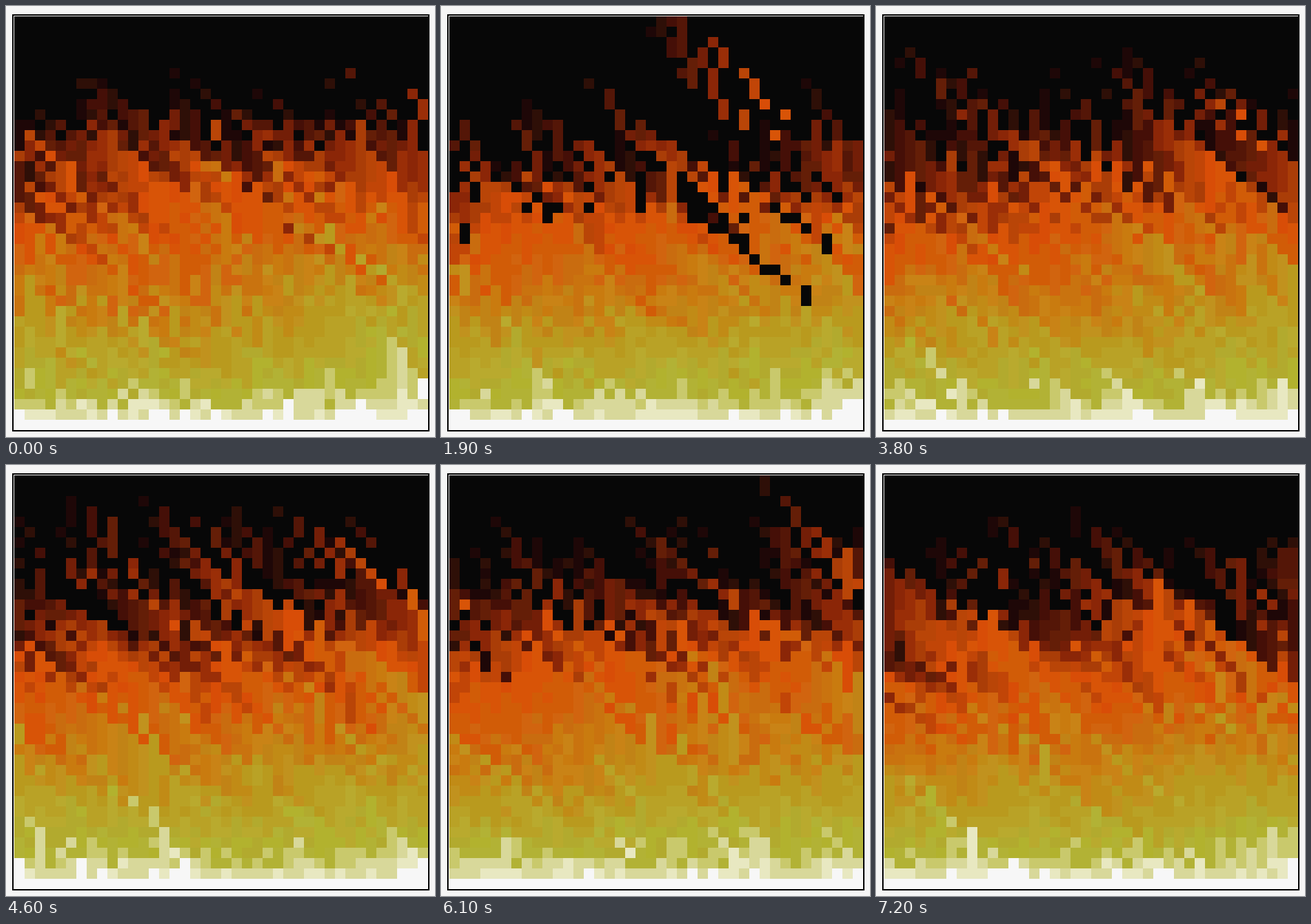
An HTML page with a canvas that plays this animation: 622x625 px, repeating every 7300 ms.

```html
<!DOCTYPE html>
<html lang="en">
<head>
<meta charset="utf-8">
<title>Fire</title>
<style>
  html, body { margin: 0; width: 100%; height: 100%; overflow: hidden; background: #f5f5f5; }
  canvas { display: block; }
</style>
</head>
<body>
<canvas id="stage" width="622" height="625"></canvas>
<script>
const SIZE = 40, CELL = 15, LEFT = 12, TOP = 15, LOOP = 7300;
const HOTTEST = 36, WARM_UP = 90, RESTART_AT = 1200, RESTART_STEPS = 7;

const palette = (
  '070707 1f0707 2f0f07 470f07 571707 671f07 771f07 8f2707 9f2f07 af3f07 ' +
  'bf4707 c74707 df4f07 df5707 df5707 d75f07 d75f07 d7670f cf6f0f cf770f ' +
  'cf7f0f cf8717 c78717 c78f17 c7971f bf9f1f bf9f1f bfa727 bfa727 bfaf2f ' +
  'b7af2f b7b72f b7b737 cfcf6f dfdf9f efefc7 ffffff'
).split(' ').map(hex => {
  const rgb = hex.match(/../g).map(part => Math.round(parseInt(part, 16) * 0.97));
  return `rgb(${rgb})`;
});

// Runs of changes, 100 ms apart: [first, last]
const runs = [
  [0, 400], [600, 700], [1200, 1200], [1400, 1700], [1900, 2400], [2600, 3300],
  [3600, 3600], [3800, 4200], [4400, 4400], [4600, 4700], [4900, 5300],
  [5500, 5900], [6100, 6200], [6400, 7000], [7200, 7200]
];

function seededRandom(seed) {
  return () => {
    seed = (seed + 0x6D2B79F5) | 0;
    let t = Math.imul(seed ^ (seed >>> 15), 1 | seed);
    t = (t + Math.imul(t ^ (t >>> 7), 61 | t)) ^ t;
    return ((t ^ (t >>> 14)) >>> 0) / 4294967296;
  };
}
const random = seededRandom(2024);

function ignite() {
  return new Uint8Array(SIZE * SIZE).fill(HOTTEST, SIZE * (SIZE - 1));
}

// Heat climbs from the bottom row; the cooling also sets the drift to the left.
function spread(heat) {
  for (let row = SIZE - 2; row >= 0; row--) {
    for (let col = 0; col < SIZE; col++) {
      const index = row * SIZE + col;
      const decay = Math.floor(random() * 3);
      const target = index - decay;
      if (target >= 0) heat[target] = Math.max(0, heat[index + SIZE] - decay);
    }
  }
}

function burn(heat, steps) {
  for (let i = 0; i < steps; i++) spread(heat);
  return heat;
}

function buildTimeline() {
  const timeline = [];
  let heat = burn(ignite(), WARM_UP);
  for (const [first, last] of runs) {
    for (let time = first; time <= last; time += 100) {
      if (time === RESTART_AT) heat = burn(ignite(), RESTART_STEPS);
      else if (time > 0) spread(heat);
      timeline.push({ time, heat: heat.slice() });
    }
  }
  return timeline;
}

const ctx = document.getElementById('stage').getContext('2d');
const timeline = buildTimeline();
let shown = null;

function rect(color, x, y, w, h) {
  ctx.fillStyle = color;
  ctx.fillRect(x, y, w, h);
}

function draw(heat) {
  heat.forEach((value, i) => {
    const x = LEFT + (i % SIZE) * CELL;
    const y = TOP + Math.floor(i / SIZE) * CELL;
    rect(palette[value], x, y, CELL, CELL);
  });
}

function tick(now) {
  const time = now % LOOP;
  const step = timeline.findLast(entry => entry.time <= time) || timeline[0];
  if (step !== shown) draw(step.heat);
  shown = step;
  requestAnimationFrame(() => tick(performance.now() - start));
}

rect('#000', 9, 12, 605, 605);
rect('#f7f7f7', 11, 14, 601, 601);
const start = performance.now();
tick(0);
</script>
</body>
</html>
```
